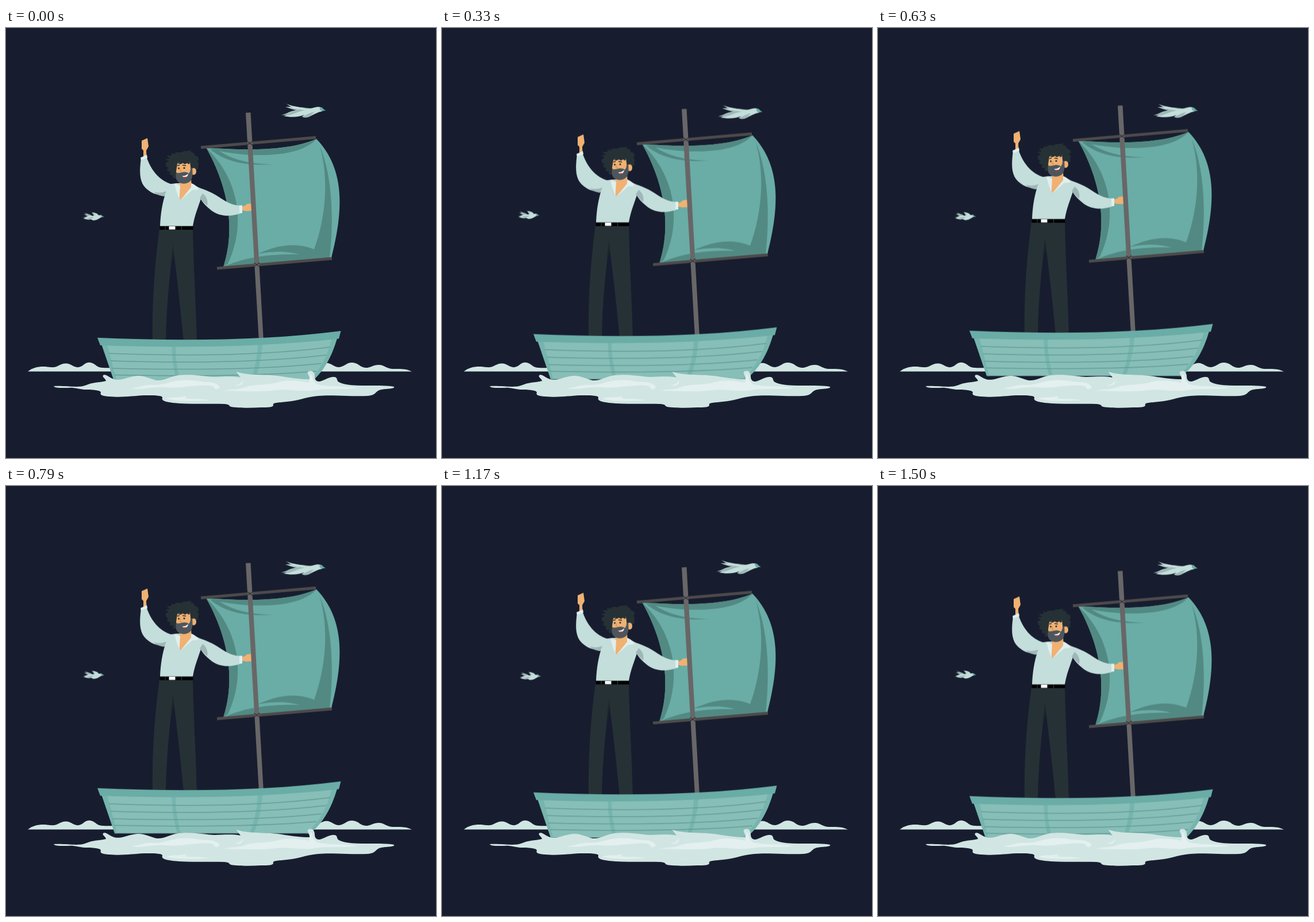
An HTML page that plays this animation: 748 px wide and 748 px high, repeating every 1.54 s.

```html
<!DOCTYPE html>
<html lang="en">
<head>
<meta charset="utf-8">
<title>Sailor on a boat</title>
<style>
  html, body { margin: 0; width: 100%; height: 100%; overflow: hidden; background: #171d2f; }
  svg { display: block; width: 100%; height: 100%; }

  .boat, .bird { animation: bob 770ms linear infinite alternate; }
  .boat { --from: 0px, .7px; --to: 0px, -14.3px; animation-delay: -35ms; }
  .bird { animation-delay: -1198ms; }
  .near { --from: 1.4px, 2.5px; --to: -1.5px, -3.2px; }
  .far { --from: -1.2px, -2.7px; --to: 1.8px, 3.1px; }
  @keyframes bob {
    from { transform: translate(var(--from)); }
    to { transform: translate(var(--to)); }
  }

  .teal { fill: #6aaca6; }
  .fold { fill: #528a83; }
  .hull { fill: #87beb8; }
  .rib { fill: #76b4ae; }
  .plank { fill: none; stroke: #659d97; stroke-width: 1.5; }
  .yard { stroke: #4d4a4b; stroke-width: 5; }
  .rope { fill: none; stroke: #2b2e35; stroke-width: 1.2; }
  .shirt { fill: #c3dedb; }
  .shade { fill: #9fb7b6; }
  .light { fill: #e0efed; }
  .skin { fill: #f0b172; }
  .dark { fill: #263136; }
  .beard { fill: #4c565c; }
  .foam { fill: #d1e6e3; }
</style>
</head>
<body>
<svg viewBox="0 0 748 748">
  <rect width="748" height="748" fill="#171d2f"/>

  <!-- distant waves -->
  <g class="foam">
    <path d="M38 597.500C47 590 60 588 72 589.500C83 591 87 590 94 586C104 581 110 584 117 588C125 592 130 590 136 585C144 579 151 582 158 588C165 593 174 590 200 592V597.500Z"/>
    <path d="M530 597.500V590C545 588 549 584 555 583C565 581 571 591 580 590C589 589 592 582 602 582C613 582 616 591 626 591C635 591 640 585 650 586C659 587 663 593 673 593C685 593 695 592 706 597.500Z"/>
  </g>

  <!-- birds -->
  <g class="bird near">
    <path class="shade" d="M487 131.500C496 136 505 138 515 138L530 140L524 146L500 142C494 140 490 139 486 137L495 137Z"/>
    <path class="shirt" d="M478.500 151.500C487 150 491 146 500 144C511 140 524 141 534 139C542 136 549 137 551 140L550 145C543 146 538 149 530 153C523 157 517 156 515 154L519 151C510 155 495 156 483 153L490 151Z"/>
    <path class="shade" d="M483 150C492 149 499 143 511 142L520 143C507 145 499 151 489 152ZM516 154C523 151 526 148 536 146L530 152C524 156 519 156 516 154Z"/>
    <path class="shirt" d="M490 133C501 137 514 137 525 142L515 142C503 141 497 140 490 138L499 138Z"/>
    <path class="teal" d="M546 138C549 137.500 551 139 552 141L556 143.500L549 144.500C546 143 545 141 546 138Z"/>
  </g>
  <g class="bird far">
    <path class="shade" d="M136 321C142 324 147 324 151 328L145 330C140 327 138 325 135 324L140 324Z"/>
    <path class="shirt" d="M133 329C140 330 143 326 150 327C154 326 157 325 162 326C165 325 167 326 168 328L161 332C156 335 151 336 148 333C143 334 138 333 134 331L139 330Z"/>
    <path class="shirt" d="M149 320.500C153 322 158 321 161 326L154 328Z"/>
    <path class="shade" d="M150 321L156 326L152 325ZM139 331C145 330 149 329 153 329L146 333Z"/>
    <path class="teal" d="M164 326C166 325.500 167 326 167 327L170.500 328.500L166 329.500Z"/>
  </g>

  <g class="boat">
    <!-- sail -->
    <path class="teal" d="M348 208C410 213 490 215 540 193C592 247 586 322 566 400L378 416C405 335 375 255 348 208Z"/>
    <g class="fold">
      <path d="M348 208C375 255 405 335 378 416L386 410C415 350 411 268 348 208Z"/>
      <path d="M348 208C410 213 490 215 540 193C520 215 480 222 432 221C400 220 370 215 348 208Z"/>
      <path d="M355 211C378 230 412 241 466 237C425 237 393 229 370 213Z"/>
      <path d="M546 206C561 258 558 325 536 385C502 371 468 379 438 393C470 387 492 389 510 394C470 393 420 396 378 416L563 400.300C571 330 567 255 546 206Z"/>
    </g>
    <path class="yard" d="M339 207.700L539 190.500M367 417.900L567 401"/>

    <!-- trousers and belt -->
    <path class="dark" d="M267 349C259 410 254 470 255 545H278C279 490 284 430 291 384C297 430 304 490 309 545H332C330 470 326 410 325 349Z"/>
    <path d="M291 377C288 392 287 402 286.500 418L292 390Z" fill="#1d272c"/>
    <path d="M267.500 344.500H325.500V351H267.500Z"/>
    <path fill="#fff" d="M283.500 345H294.500V350.500H283.500Z"/>
    <path d="M277 344.500V351M305.500 344.500V351" stroke="#3a4449"/>

    <!-- hands -->
    <path class="skin" d="M236 196L246 191.500L248 206L244 213L244.500 224H239L239 213L236 210Z"/>
    <path class="skin" d="M409 311L416 309L419 306L430 305V318L418 318.500L410 317Z"/>

    <!-- shirt -->
    <g class="shirt">
      <path d="M268 344.500C269 322 272 304 278 286L282 272L296 270L322 270L340 280L340 294C335 310 328 326 325 344.500Z"/>
      <path d="M235 226C232 248 232 264 240 275C250 287 262 291 278 292L293 273C270 268 254 251 245 226Z"/>
      <path d="M330 276C347 281 361 287 375 297C387 305 397 309 409 309L409 322C391 329 372 328 358 318C348 310 342 304 336 293Z"/>
    </g>
    <path class="shade" d="M257 285C264 287 271 287 279 284L275 293C268 292 262 290 257 285ZM342 288C348 292 352 300 350 309C345 305 341 300 337 296Z"/>
    <path class="light" d="M234 225.500L245 220.500L246 226L235 230ZM406 308.500H411V322H406Z"/>

    <!-- neck and collar -->
    <path class="skin" d="M302 266L322 262L323 278L304 299L301 296Z"/>
    <path class="light" d="M293 271L303 274L301.500 298L297 286ZM322 270C328 272 333 276 335 281L324 282L303 300L322 277Z"/>

    <!-- head -->
    <path class="dark" d="M278 235L283 232L277 228L285 227L279 222L288 222C286 219 289 217 293 219C296 215 302 216 304 217C309 213 317 214 323 213L321 216C326 216 329 219 328 222C333 222 336 226 335 230L332 231C336 234 336 238 334 240L335 244L330 248L322 260H298C291 264 288 259 291 256C284 257 283 252 287 250C280 250 278 246 283 243C279 243 277 238 278 235Z"/>
    <path class="skin" d="M298 236C303 232 312 236 320 233L322 250C322 260 314 267 307 266C299 265 296 258 296 249Z"/>
    <ellipse class="skin" cx="326.500" cy="249.500" rx="4.500" ry="6"/>
    <path class="dark" d="M299 236C306 231 315 231 321 234L318 237L315 235L311 237L308 235L303 237Z"/>
    <path class="beard" d="M296 251C300 254 303 251 307 251C312 250 316 251 318 253C320 251 321 248 321 244L324 243C325 253 325 262 320 267C314 272 302 272 298 266C295 262 295 256 296 251Z"/>
    <path fill="#fff" d="M306 257.500C310 258 314 256 317 253.500C317 256 315 258.500 313 259.500C310 260 308 259 306 257.500Z"/>
    <path fill="#b43c43" d="M308 260C310 258.500 313 258.500 314.500 259C313 262 309 262 308 260Z"/>
    <circle class="dark" cx="300.500" cy="244" r="1.500"/>
    <circle class="dark" cx="310" cy="243.500" r="1.600"/>
    <path d="M298 239.500L302 238.500M307 238.500L313 239.500" stroke="#263136" stroke-width="1.400"/>
    <path d="M304 244L302.500 249H306" fill="none" stroke="#d18b50"/>

    <!-- mast -->
    <path fill="#686667" d="M417 147.500L425.500 147L448 545H440Z"/>
    <path class="rope" d="M419.500 197L429 204M419 203.500L429 197.500M431.500 408.500L441 415M431.500 415L441 408"/>

    <!-- hull -->
    <path class="hull" d="M168 548L191 617.500H528C551 600 566 571 576 537Z"/>
    <g class="rib">
      <path d="M166 550H176L193 617.500H189Z"/>
      <path d="M288.500 553H295C295 575 298 597 304 617.500H298C292 597 289 577 288.500 553Z"/>
      <path d="M438 551H446C444 575 439 597 431 617.500H424C432 597 437 575 438 551Z"/>
      <path d="M567 540H576C566 574 551 601 528 617.500H522C545 600 559 571 567 540Z"/>
    </g>
    <g class="plank">
      <path d="M179 566C310 571 450 570 564 555"/>
      <path d="M182 579C310 583 445 582 557 569"/>
      <path d="M185 592C310 595 440 595 549 583.500"/>
      <path d="M188 603.500C310 606 435 606 540 597"/>
    </g>
    <path class="teal" d="M159 538.700C300 545 450 544 582.500 527L579 540.500C450 555 300 557 164 552Z"/>
  </g>

  <!-- foam around the hull -->
  <path class="foam" d="M83 623C110 622 125 627 140 621C151 616 161 617 174 614C173 609 167 608 169 604C174 601 180 609 188 611C199 614 210 608 222 606C238 602 249 610 262 613C276 614 285 606 300 604C319 602 333 604 350 606C369 609 386 604 408 608L400.500 598C426 606 456 601 485 607C500 609 512 611 528 611C529 606 522 600 526 597.500C533 594 537 600 537 606C537 612 540 615 545 615C554 613 563 606 571 607C578 608 574 613 579 616C590 622 610 622 628 622C648 622 665 622 675 624C677 628 662 627 653 629C640 632 646 639 628 640C597 641 565 638 543 640C520 642 507 649 489 650C475 652 463 651 465 656C465 660 456 660 443 660C425 661 404 661 392 659C386 657 391 655 380 654C351 653 322 655 290 652C276 650 270 648 272 643C273 639 258 639 240 639C220 640 204 643 179 641C166 640 163 638 165 634C165 630 150 629 136 629C124 628 119 625 109 626C99 626 85 627 83 623Z"/>
  <g fill="#e3f0ef">
    <path d="M218 627C235 625 240 620 255 621C275 622 285 614 304 613C325 611 335 616 350 616C364 616 374 622 371 626C368 630 362 628 362 625C360 621 348 621 336 622C314 623 299 627 278 625C255 623 236 630 218 627Z"/>
    <path d="M278 645C290 641 303 644 314 640C304 649 333 642 354 648C330 648 305 651 278 645Z"/>
    <path d="M379 631C396 628 405 629 415 625C434 618 456 622 475 616C493 611 510 614 527 617L530 601C535 608 533 616 542 620C560 625 590 622 612 626C586 630 562 626 538 630C512 634 492 627 470 630C439 634 407 631 379 631Z"/>
    <path d="M397 622C406 621 410 617 412 613C414 619 407 624 397 622Z"/>
  </g>
</svg>
</body>
</html>
```
